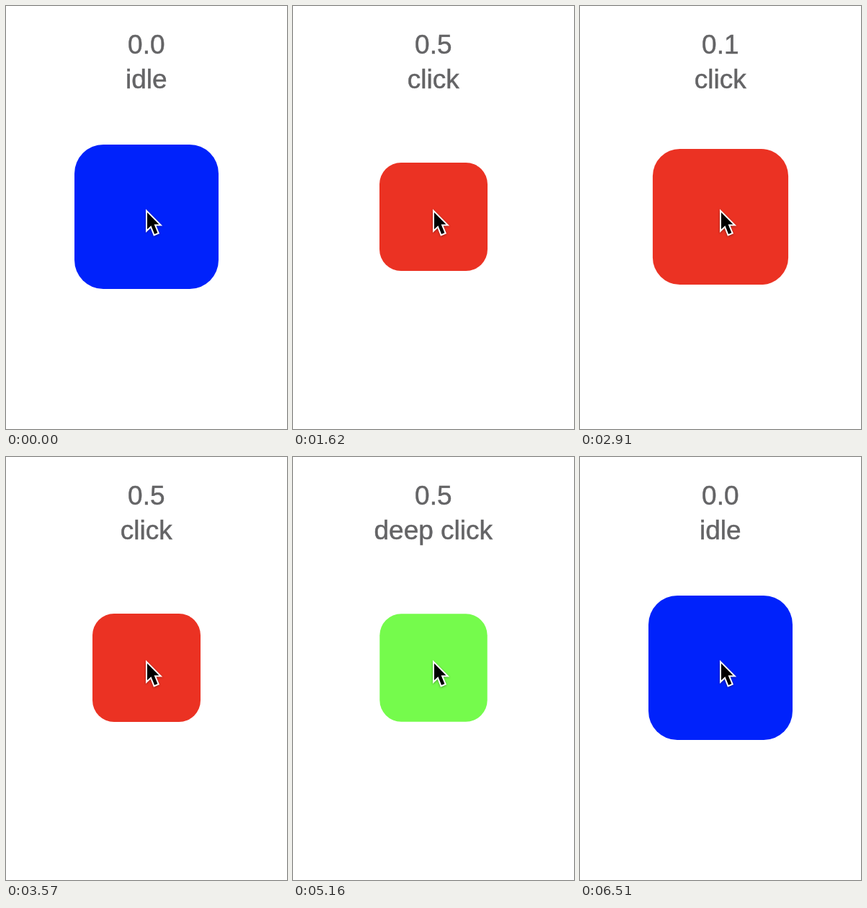
Write an HTML page that moves like this. It is 390x586 px and loops after 6540 ms.

```html
<!DOCTYPE html>
<html lang="en">
<head>
<meta charset="utf-8">
<title>Pressure button</title>
<style>
  html, body { margin: 0; width: 100%; height: 100%; overflow: hidden; background: #fff; }
  svg { display: block; width: 100%; height: 100%; }
  text {
    font: 37px "Liberation Sans", Arial, sans-serif;
    fill: #646466; stroke: #646466; stroke-width: .5; text-anchor: middle;
  }
  #cursor {
    stroke: #fff; stroke-width: 4; paint-order: stroke; stroke-miterlimit: 6;
    filter: drop-shadow(0 1.5px 1.5px rgba(0, 0, 0, .35));
  }
</style>
</head>
<body>
<svg viewBox="0 0 390 586">
  <text id="value" x="194.8" y="66.3"></text>
  <text id="label" x="194.8" y="114.3"></text>
  <rect id="button"/>
  <path id="cursor" d="M196 286V309.3L201.4 204.2" />
</svg>
<script>
const LOOP = 6540, STEP = 30;
const CENTER = { x: 195, y: 292 };
const COLORS = { idle: '#0022fb', click: '#eb3223', 'deep click': '#75fb4c' };

// Each move eases the force to a new level; between moves it holds.
const MOVES = [
  { from: 275, to: 955, force: .5 },
  { from: 2000, to: 2568, force: .03 },
  { from: 2730, to: 3380, force: .5 },
  { from: 3840, to: 4470, force: 1 },
  { from: 4575, to: 5200, force: .5 },
  { from: 5950, to: 6450, force: 0 }
];

const [value, label, button, cursor] =
  ['value', 'label', 'button', 'cursor'].map(id => document.getElementById(id));
cursor.setAttribute('d', 'M196 286V309.3L201.4 304.2L206.1 316L210.4 314.2L205.6 302.6H212.4Z');

function ease(from, to, time) {
  const u = Math.min(1, Math.max(0, (time - from) / (to - from)));
  return u * u * (3 - 2 * u);
}

const forceAt = time => MOVES.reduce(
  (force, move) => force + (move.force - force) * ease(move.from, move.to, time), 0);

function stateOf(force) {
  if (force < .005) return 'idle';
  return force > .505 ? 'deep click' : 'click';
}

function draw(time) {
  const force = forceAt(Math.floor(time / STEP) * STEP);
  const state = stateOf(force);
  const size = 200 - 100 * force;
  const box = {
    x: CENTER.x - size / 2,
    y: CENTER.y - size / 2,
    width: size,
    height: size,
    rx: size / 5,
    fill: COLORS[state]
  };
  value.textContent = force.toFixed(1);
  label.textContent = state;
  for (const name in box) button.setAttribute(name, box[name]);
}

const start = performance.now();
function tick() {
  draw((performance.now() - start) % LOOP);
  requestAnimationFrame(tick);
}
tick();
</script>
</body>
</html>
```
